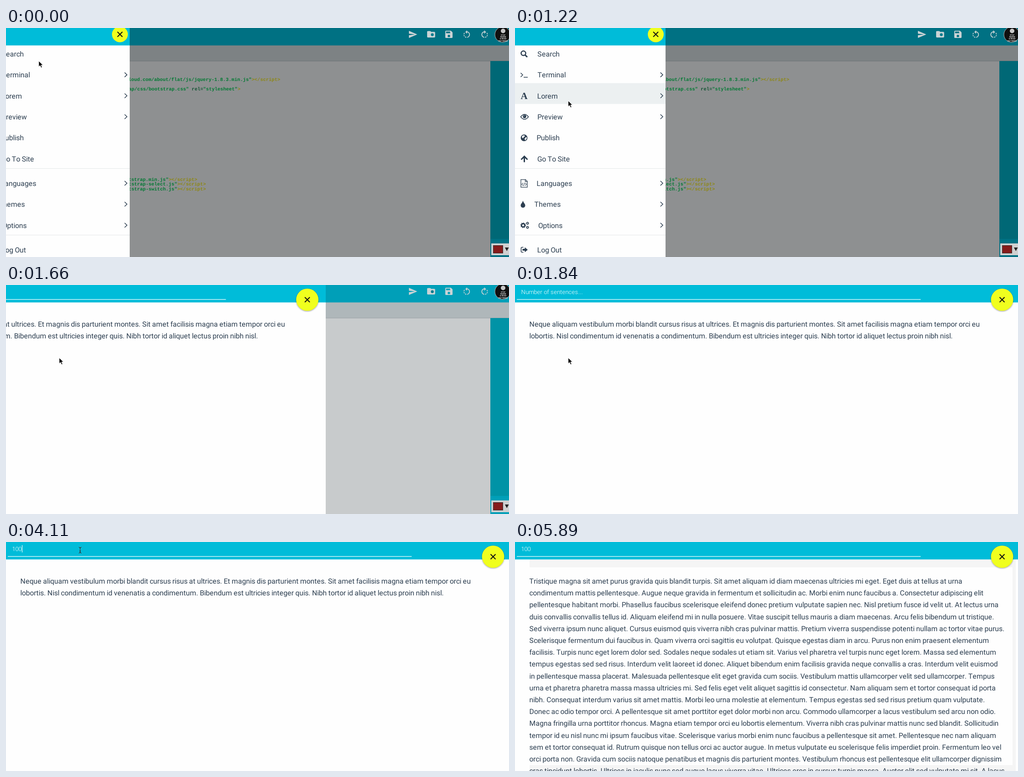
An HTML page that plays this animation: 1106x506 px, repeating every 6130 ms.

```html
<!DOCTYPE html>
<html lang="en">
<head>
<meta charset="utf-8">
<title>Editor menu</title>
<style>
html, body { margin: 0; width: 100%; height: 100%; overflow: hidden; background: #fff; }
svg { display: block; width: 100%; height: 100%; text-rendering: geometricPrecision; }
text { white-space: pre; font-family: Roboto, sans-serif; }
.code text { font: bold 10.5px "Liberation Mono", monospace; fill: #00c853; }
.code .tag { fill: #ebe020; }
.code .attr { fill: #1f8a55; }
.badge text { font-size: 4.2px; font-weight: 700; fill: #ddd; text-anchor: middle; }
.menu text, .body text { font-size: 15.75px; fill: #2c3e50; }
.menu text.serif { font: bold 21px "Liberation Serif", serif; text-anchor: middle; }
.field { font-size: 13.125px; font-weight: 300; fill: #fff; }
.line { fill: none; stroke: #2c3e50; stroke-width: 1.5; }
.solid { fill: #2c3e50; }
.round { filter: drop-shadow(0 1.5px 1.5px rgba(0, 0, 0, .4)); }
</style>
</head>
<body>
<svg viewBox="0 0 1106 506" preserveAspectRatio="none">
  <defs>
    <clipPath id="row"><rect y="125" width="331" height="46"/></clipPath>
    <path id="turn" d="M7.11 8.53L5.7 7.11C4.8 8.27 4.24 9.61 4.07 11h2.02c.14-.87.49-1.72 1.02-2.47zM6.09 13H4.07c.17 1.39.72 2.73 1.62 3.89l1.41-1.42c-.52-.75-.87-1.59-1.01-2.47zm1.01 5.32c1.16.9 2.51 1.44 3.9 1.61V17.9c-.87-.15-1.71-.49-2.46-1.03L7.1 18.32zM13 4.07V1L8.45 5.55 13 10V6.09c2.84.48 5 2.94 5 5.91s-2.16 5.43-5 5.91v2.02c3.95-.49 7-3.85 7-7.93s-3.05-7.44-7-7.93z"/>
    <path id="cross" d="M-5.5-5.5L5.5 5.5M5.5-5.5L-5.5 5.5" stroke="#111" stroke-width="2.1"/>
    <path id="ibeam" d="M-3-6.5Q0-6.5 0-4.5Q0-6.5 3-6.5M0-5V5M-3 6.5Q0 6.5 0 4.5Q0 6.5 3 6.5M-1.5 2H1.5"/>
  </defs>

  <g id="page">
    <rect width="1106" height="506" fill="#ecf0f1"/>
    <rect y="38" width="1106" height="35" fill="#cfd8dc"/>
    <rect width="1106" height="38.5" fill="#00bcd9"/>
    <rect y="72.5" width="1106" height="1" fill="#b4bdc1"/>
    <rect x="1065" y="73" width="41" height="393" fill="#00adc4"/>
    <rect x="1065" y="466" width="41" height="40" fill="#00bcd9"/>
    <g class="code" id="code" text-anchor="end"></g>
  </g>
  <rect id="shade" width="1106" height="506"/>

  <g fill="#cbd3d5">
    <path transform="translate(884.2 3.7) scale(.87)" d="M2 21L23 12 2 3v7l15 2-15 2z"/>
    <g transform="translate(924.2 3.3) scale(.88)">
      <path d="M10 4H4c-1.1 0-2 .9-2 2v12c0 1.1.9 2 2 2h16c1.1 0 2-.9 2-2V8c0-1.1-.9-2-2-2h-8z"/>
      <circle cx="15" cy="13" r="3.6" fill="#007c8e"/>
    </g>
    <path transform="translate(963.2 3.4) scale(.89)" d="M17 3H5c-1.1 0-2 .9-2 2v14c0 1.1.9 2 2 2h14c1.1 0 2-.9 2-2V7zm-5 16a3 3 0 1 1 0-6 3 3 0 0 1 0 6zm3-10H5V5h10z"/>
    <use href="#turn" transform="translate(1002.5 4) scale(.88)"/>
    <use href="#turn" transform="translate(1063 4) scale(-.88 .88)"/>
  </g>
  <g class="badge">
    <circle cx="1092" cy="14.5" r="17" fill="#101010" stroke="#b5b5b5"/>
    <circle cx="1093" cy="6.5" r="5" fill="#c8c8c8"/>
    <text x="1093" y="17">STAY</text><text x="1093" y="21.2">WARM</text>
    <text x="1093" y="25.4">&amp; READ</text><text x="1093" y="29.6">PATTERNS</text>
  </g>
  <rect x="1067" y="476" width="40" height="26" fill="#d0d0d0"/>
  <rect x="1071.5" y="480.5" width="21" height="17" fill="#851b1b" stroke="#333"/>
  <path d="M1097 485h8.5l-4.2 8z" fill="#222"/>

  <g class="menu" id="menu">
    <rect width="331" height="506" fill="#fefefe"/>
    <rect width="331" height="38.5" fill="#00bcd9"/>
    <rect id="hover" width="331" height="46" fill="#ecf0f1"/>
    <circle id="ripple" cx="118" cy="160" fill="#bddede" clip-path="url(#row)"/>
    <path d="M0 310.5H331M0 457.5H331" stroke="#e4e7e8"/>
    <g id="items"></g>
    <circle cx="309.5" cy="14" r="17.5" fill="#f0ff1e"/>
    <use href="#cross" x="309.5" y="14"/>
  </g>

  <g id="panel">
    <rect width="1111.5" height="506" fill="#fefefe"/>
    <g class="body" id="short"></g>
    <g class="body" id="long">
      <path d="M32 38H1101V506H32V493H1094V56H32z" fill="#f5f5f5"/>
    </g>
    <rect width="1111.5" height="38.5" fill="#00bcd9"/>
    <rect x="4" y="31.3" width="888" height="1.3" fill="#f4fdff"/>
    <text class="field" id="field" y="19.5"></text>
    <rect id="caret" width="1.1" fill="#fff"/>
    <circle class="round" cx="1071" cy="32.5" r="24.5" fill="#f0ff1e"/>
    <use href="#cross" x="1071" y="32.5"/>
  </g>

  <path id="arrow" d="M0 0V12.6L3 9.8 5.2 14.8 7.4 13.8 5.2 9H9.2z" fill="#000" stroke="#fff" stroke-width=".8"/>
  <g id="beam" fill="none">
    <use href="#ibeam" stroke="#fff" stroke-opacity=".25" stroke-width="2"/>
    <use href="#ibeam" stroke="#111"/>
  </g>
</svg>
<script>
const $ = id => document.getElementById(id);
const LOOP = 6130;

// The picture is held between these moments.
const ticks = [0, 150, 330, 480, 930, 1080, 1230, 1380, 1510, 1660, 1840, 2020, 2170,
  2620, 2770, 2920, 3060, 3660, 3960, 4110, 4410, 4710, 4860, 5010, 5160, 5310, 5440, 5890];

// The interface is laid out at full size with whole-pixel glyph advances, then shown at 7/8.
const SCALE = .875;
const pen = document.createElement('canvas').getContext('2d');
function glyphs(s, x, size = 18, weight = 400) {
  pen.font = `${weight} ${size * 10}px Roboto, sans-serif`;
  return [...s].map(c => {
    const at = x;
    x += Math.round(pen.measureText(c).width / 10) * SCALE;
    return at.toFixed(2);
  }).join(' ');
}
const label = (s, x, y) => `<text x="${glyphs(s, x)}" y="${y}">${s}</text>`;

const tag = s => `<tspan class="tag">${s}</tspan>`;
const close = tag('&gt;&lt;/script&gt;');
const code = [
  [603, 117, 'cloud.com/about/flat/js/jquery-1.8.3.min.js"' + close],
  [515.5, 138, 'bootstrap/css/bootstrap.css" <tspan class="attr">rel=</tspan>"stylesheet"' + tag('&gt;')],
  [420.5, 337.5, 'bootstrap.min.js"' + close],
  [439.5, 348, 'bootstrap-select.js"' + close],
  [439.5, 358.5, 'bootstrap-switch.js"' + close]
];
$('code').innerHTML = code.map(([x, y, s]) => `<text x="${x}" y="${y}">${s}</text>`).join('');

const line = (d, w = 1.5, color = '#2c3e50') => `<path class="line" d="${d}" style="stroke:${color};stroke-width:${w}"/>`;
const solid = d => `<path class="solid" d="${d}"/>`;
const ring = (x, y, r, w) => `<circle class="line" cx="${x}" cy="${y}" r="${r}" style="stroke-width:${w}"/>`;
const gear = (x, y, r) => ring(x, y, r, r * .75) +
  `<circle class="line" cx="${x}" cy="${y}" r="${r * 1.45}" pathLength="16" stroke-dasharray="1" style="stroke-width:${r * .4}"/>`;

// name, text x, centre y, has submenu, icon around (20, y)
const items = [
  ['Search', 49.3, 57.3, 0, ring(-1.5, -1.5, 5, 2.5) + line('M2.3 2.3L7 7', 3)],
  ['Terminal', 49.5, 103.7, 1, line('M-7.5-4.5L-3 0L-7.5 4.5M-1 5H8')],
  ['Lorem', 48.8, 150, 1, '<text class="serif" y="7">A</text>'],
  ['Preview', 49.3, 196.3, 1, line('M-7.5 0Q1-11 9.5 0Q1 11-7.5 0z', 1.6) +
    '<circle class="solid" cx="1" cy="-.8" r="3.7"/>' + line('M-.8-1Q-.6-2.7 1-2.8', .8, '#fff')],
  ['Publish', 47.4, 242.7, 0, '<circle class="solid" r="7.4"/><path d="M-4-4.5L0-6L2-3.5L-1-1.5L-2 1L-5-1zM2 0L5.5-2L6 1L3 5.5L1 3z" fill="#fff"/>'],
  ['Go To Site', 49, 289, 0, solid('M.5-7.5L8.5.8L6.5 2.8L2-1.5V7.5H-1V-1.5L-5.5 2.8L-7.5.8z')],
  ['Languages', 47.4, 343.3, 1, line('M-7-8.5H3L7-4.5V8.5H-7zM2.5-8.5V-4H7', 1.3) + line('M-2.5-1L-5 2L-2.5 5M2.5-1L5 2L2.5 5M1-1.5L-1 5.5', 1.1)],
  ['Themes', 42.6, 389.6, 1, solid('M-2.5-8C-1.5-3.5 2.5-1 2.5 2.5A5 5 0 0 1-7.5 2.5C-7.5-1-3.5-3.5-2.5-8z')],
  ['Options', 51, 436, 1, gear(-2, 0, 3.7) + gear(7.5, -4.5, 2) + gear(7.5, 4.5, 2)],
  ['Log Out', 48.7, 490, 0, line('M-1.5-5.5H-4.5Q-6.5-5.5-6.5-3.5V3.5Q-6.5 5.5-4.5 5.5H-1.5', 1.6) +
    solid('M-3.5-2H1.5V-5.5L8 0L1.5 5.5V2H-3.5z')]
];
$('items').innerHTML = items.map(([name, x, y, more, icon]) =>
  `<g transform="translate(20 ${y})">${icon}</g>` + label(name, x, y + 5.7) +
  (more ? `<g transform="translate(322.5 ${y - .3})">${line('M-2.7-5L2.5 0L-2.7 5')}</g>` : '')).join('');

const few = `Neque aliquam vestibulum morbi blandit cursus risus at ultrices. Et magnis dis parturient montes. Sit amet facilisis magna etiam tempor orci eu
lobortis. Nisl condimentum id venenatis a condimentum. Bibendum est ultricies integer quis. Nibh tortor id aliquet lectus proin nibh nisl.`;
const many = `Tristique magna sit amet purus gravida quis blandit turpis. Sit amet aliquam id diam maecenas ultricies mi eget. Eget duis at tellus at urna
condimentum mattis pellentesque. Augue neque gravida in fermentum et sollicitudin ac. Morbi enim nunc faucibus a. Consectetur adipiscing elit
pellentesque habitant morbi. Phasellus faucibus scelerisque eleifend donec pretium vulputate sapien nec. Nisl pretium fusce id velit ut. At lectus urna
duis convallis convallis tellus id. Aliquam eleifend mi in nulla posuere. Vitae suscipit tellus mauris a diam maecenas. Arcu felis bibendum ut tristique.
Sed viverra ipsum nunc aliquet. Cursus euismod quis viverra nibh cras pulvinar mattis. Pretium viverra suspendisse potenti nullam ac tortor vitae purus.
Scelerisque fermentum dui faucibus in. Quam viverra orci sagittis eu volutpat. Quisque egestas diam in arcu. Purus non enim praesent elementum
facilisis. Turpis nunc eget lorem dolor sed. Sodales neque sodales ut etiam sit. Varius vel pharetra vel turpis nunc eget lorem. Massa sed elementum
tempus egestas sed sed risus. Interdum velit laoreet id donec. Aliquet bibendum enim facilisis gravida neque convallis a cras. Interdum velit euismod
in pellentesque massa placerat. Malesuada pellentesque elit eget gravida cum sociis. Vestibulum mattis ullamcorper velit sed ullamcorper. Tempus
urna et pharetra pharetra massa massa ultricies mi. Sed felis eget velit aliquet sagittis id consectetur. Nam aliquam sem et tortor consequat id porta
nibh. Consequat interdum varius sit amet mattis. Morbi leo urna molestie at elementum. Tempus egestas sed sed risus pretium quam vulputate.
Donec ac odio tempor orci. A pellentesque sit amet porttitor eget dolor morbi non arcu. Commodo ullamcorper a lacus vestibulum sed arcu non odio.
Magna fringilla urna porttitor rhoncus. Magna etiam tempor orci eu lobortis elementum. Viverra nibh cras pulvinar mattis nunc sed blandit. Sollicitudin
tempor id eu nisl nunc mi ipsum faucibus vitae. Scelerisque varius morbi enim nunc faucibus a pellentesque sit amet. Pellentesque nec nam aliquam
sem et tortor consequat id. Rutrum quisque non tellus orci ac auctor augue. In metus vulputate eu scelerisque felis imperdiet proin. Fermentum leo vel
orci porta non. Gravida cum sociis natoque penatibus et magnis dis parturient montes. Vestibulum rhoncus est pellentesque elit ullamcorper dignissim
cras tincidunt lobortis. Ultrices in iaculis nunc sed augue lacus viverra vitae. Ultrices eros in cursus turpis massa. Auctor elit sed vulputate mi sit. A lacus`;
const fill = (id, copy) => $(id).insertAdjacentHTML('beforeend',
  copy.split('\n').map((s, i) => label(s, 31.6, 92 + 26.2 * i)).join(''));
fill('short', few);
fill('long', many);

const clamp = v => Math.min(1, Math.max(0, v));
const span = (t, a, b) => clamp((t - a) / (b - a));
const ease = p => p < .5 ? 2 * p * p : 1 - 2 * (1 - p) ** 2;

// Position on a path of [time, x, y] points.
function follow(path, t) {
  let i = 1;
  while (i < path.length - 1 && t > path[i][0]) i++;
  const [a, x, y] = path[i - 1], [b, u, v] = path[i], p = span(t, a, b);
  return [x + (u - x) * p, y + (v - y) * p];
}
const arrowPath = [[0, 72, 73], [480, 124, 195], [780, 124, 195], [1080, 117, 161], [1840, 117, 161], [2020, 140, 147]];
const beamPath = [[2620, 154, 13], [2920, 163, 18], [4560, 163, 18], [5400, 1036, 496]];

const set = (id, name, v) => $(id).setAttribute(name, v);
const move = (id, x, y = 0) => set(id, 'transform', `translate(${x} ${y})`);
const show = (id, on) => set(id, 'visibility', on ? 'visible' : 'hidden');

function draw(t) {
  move('menu', -59 * (1 - span(t, 0, 330)) ** 3 - 331 * ease(span(t, 1455, 1847)));
  move('panel', -1112 * (1 - ease(span(t, 1436, 1828))));
  set('shade', 'opacity', .4 * (1 - span(t, 1490, 1765)));

  const [x, y] = follow(arrowPath, t);
  move('arrow', x, y);
  show('arrow', t < 2170);
  set('hover', 'y', 168 + 46.3 * Math.floor((y - 168) / 46.3));
  show('hover', t >= 150);
  set('ripple', 'r', 48 * span(t, 1270, 1510));

  move('beam', ...follow(beamPath, t));
  show('beam', t >= 2620 && t < 5440);

  const typed = t < 3660 ? 0 : t < 3960 ? 1 : t < 4110 ? 2 : 3;
  const value = typed ? '100'.slice(0, typed) : 'Number of sentences...';
  $('field').textContent = value;
  set('field', 'x', glyphs(value, 13.6, 15, 300));
  set('caret', 'x', 14 + 7 * typed);
  set('caret', 'y', typed ? 7 : 5);
  set('caret', 'height', typed ? 16 : 19);
  show('caret', t >= 3060 && t < 4710 || t >= 5310 && t < 5890);
  show('short', t < 4410);
  show('long', t >= 4410);
}

const start = performance.now();
function loop() {
  const t = (performance.now() - start) % LOOP;
  draw(ticks.findLast(k => k <= t));
  requestAnimationFrame(loop);
}
loop();
</script>
</body>
</html>
```
